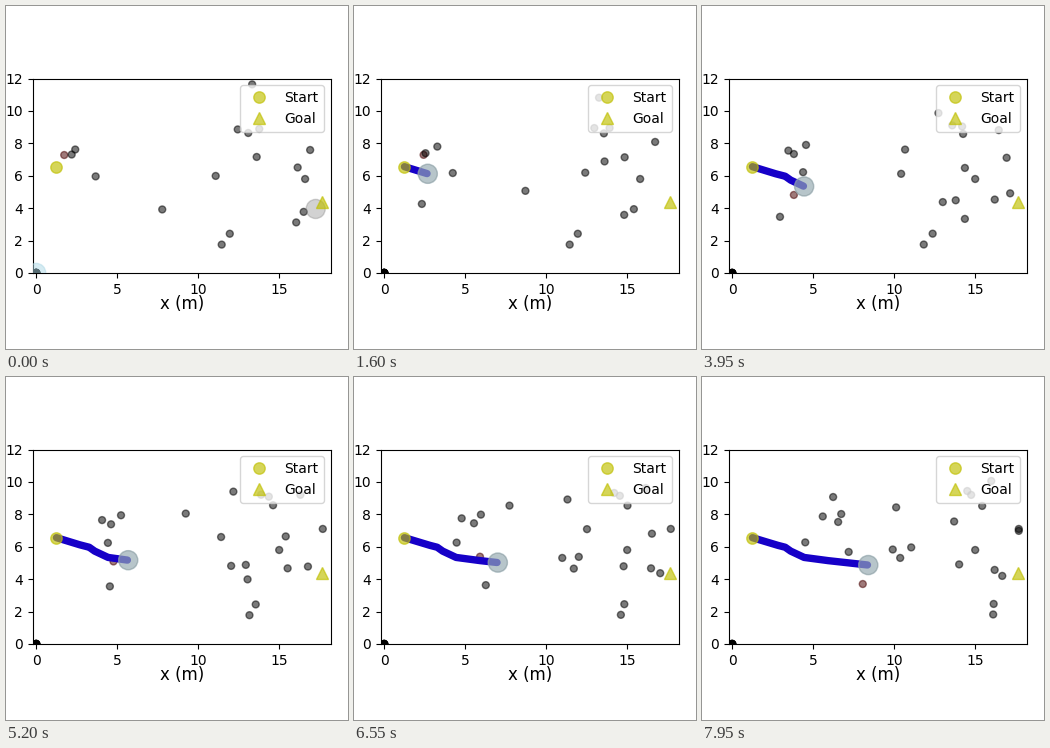
These frames come from a looping animation (342x343 px, 8000 ms). A matplotlib script:

```python
import numpy as np
import matplotlib.pyplot as plt
from matplotlib.animation import FuncAnimation
from matplotlib.patches import Circle

W, H, DPI = 342, 343, 100
FRAMES, STEP = 160, 50
END = 7.95    # seconds at the last frame
SCALE = 16.2  # pixels per metre
XLIM, YLIM = (-0.2, 18.2), (0, 12)
START, GOAL = (1.25, 6.56), (17.62, 4.35)
IDLE = 6      # walkers that never leave the origin

BLACK = (0, 0, 0, 0.52)
RED = (0.28, 0, 0, 0.52)


def walk(a, b, ease=(1, 1), begin=0, stop=END, enter=0):
    """Walk from a to b, each axis eased by a power; wait at the origin until enter."""
    a, b = np.array(a), np.array(b)

    def at(t):
        if t < enter:
            return np.zeros(2)
        u = np.clip((t - begin) / (stop - begin), 0, 1)
        return a + (b - a) * u ** np.array(ease)
    return at


def arrive(t, a, b, ease=(1, 1)):
    """A walker who steps into view at time t."""
    return walk(a, b, ease, begin=t, enter=t)


walkers = [
    # eastbound on the left
    walk((1.73, 7.28), (6.54, 7.53), (1.2, 2)),
    walk((2.19, 7.31), (5.59, 7.87), (1.4, 1.2)),
    walk((2.41, 7.62), (6.73, 8.02), (1, 0.5)),
    walk((3.67, 5.96), (4.51, 6.27), (0.25, 0.25)),
    arrive(0.5, (1.91, 3.95), (7.19, 5.68), (1.33, 0.9)),
    arrive(2.0, (0.46, 3.15), (8.06, 3.70), (1, 0.5)),
    # eastbound in the middle
    walk((7.78, 3.92), (13.70, 7.56), (1.15, 0.72)),
    walk((11.08, 5.99), (17.69, 6.98)),
    walk((13.61, 7.16), (17.69, 7.10), (1.1, 1), stop=4.75),
    # a pair that stands still, then sets off
    walk((11.45, 1.75), (16.11, 1.82), begin=3.6),
    walk((11.95, 2.42), (16.14, 2.47), begin=3.5),
    # slow strollers at the top
    walk((12.44, 8.86), (14.51, 9.44), (0.85, 1.2)),
    walk((13.09, 8.64), (15.43, 8.52)),
    walk((13.77, 8.89), (14.75, 9.20), (1.2, 1)),
    walk((16.91, 7.59), (15.99, 10.06)),
    # westbound
    walk((13.33, 11.64), (10.12, 8.43), (2.4, 0.85)),
    walk((16.14, 6.51), (6.23, 9.07), (0.85, 1.2)),
    walk((16.60, 5.80), (15.0, 5.80), stop=3.2),
    walk((16.51, 3.77), (11.05, 5.96), (1, 1.6)),
    walk((16.05, 3.12), (9.91, 5.83), (1, 1.1)),
    arrive(1.7, (17.25, 1.91), (10.37, 5.31), (0.85, 0.85)),
    arrive(2.05, (17.25, 4.14), (14.01, 4.91), (1, 0.6)),
    arrive(3.7, (17.31, 4.97), (16.20, 4.57), (0.7, 0.7)),
    arrive(6.2, (17.13, 4.41), (16.67, 4.20)),
]


def robot(t):
    times = [0, 1.6, 2.45, 2.95, 3.95, 5.2, END]
    x = np.interp(t, times, [START[0], 2.69, 3.27, 3.61, 4.44, 5.68, 8.40])
    y = np.interp(t, times, [START[1], 6.12, 5.97, 5.73, 5.34, 5.17, 4.87])
    return x, y


fig = plt.figure(figsize=(W / DPI, H / DPI), dpi=DPI, facecolor="white")
left, bottom = 30.2 + XLIM[0] * SCALE, 76.05
ax = fig.add_axes([left / W, bottom / H,
                   (XLIM[1] - XLIM[0]) * SCALE / W, YLIM[1] * SCALE / H])
ax.set(xlim=XLIM, ylim=YLIM)
ax.set_xticks([0, 5, 10, 15])
ax.set_yticks(range(0, 13, 2))
ax.set_xlabel("x (m)", fontsize=12, labelpad=-1)

origin = np.zeros(len(walkers) + IDLE)
dots = ax.scatter(origin, origin, s=25, lw=1, zorder=2)
trail, = ax.plot([], [], color="#1600c8", lw=5.3, solid_capstyle="round",
                 solid_joinstyle="round", zorder=3)
halo = ax.add_patch(Circle((0, 0), 0.59, color="lightblue", alpha=0.5, zorder=4))
body = ax.add_patch(Circle((0, 0), 0.59, color="gray", alpha=0.35, zorder=4.1))
for spot, marker, name in ((START, "o", "Start"), (GOAL, "^", "Goal")):
    ax.plot(*spot, marker, color="y", ms=8.2, alpha=0.65, label=name, zorder=4.5)
ax.legend(loc="upper right", fontsize=10).set_zorder(6)


def draw(i):
    now = i * STEP / 1000
    spots = np.array([w(now) for w in walkers] + [(0, 0)] * IDLE)
    me = robot(now)
    colors = [BLACK] * len(spots)
    colors[int(np.argmin(np.hypot(*(spots - me).T)))] = RED
    dots.set_offsets(spots)
    dots.set_color(colors)
    trail.set_data(*robot(np.arange(i) * STEP / 1000))
    halo.center = me if i else (0, 0)
    body.center = me if i else (17.25, 3.95)
    return dots, trail, halo, body


anim = FuncAnimation(fig, draw, frames=FRAMES, interval=STEP, init_func=lambda: draw(0),
                     repeat=True, repeat_delay=0, blit=False)
plt.show()
```
